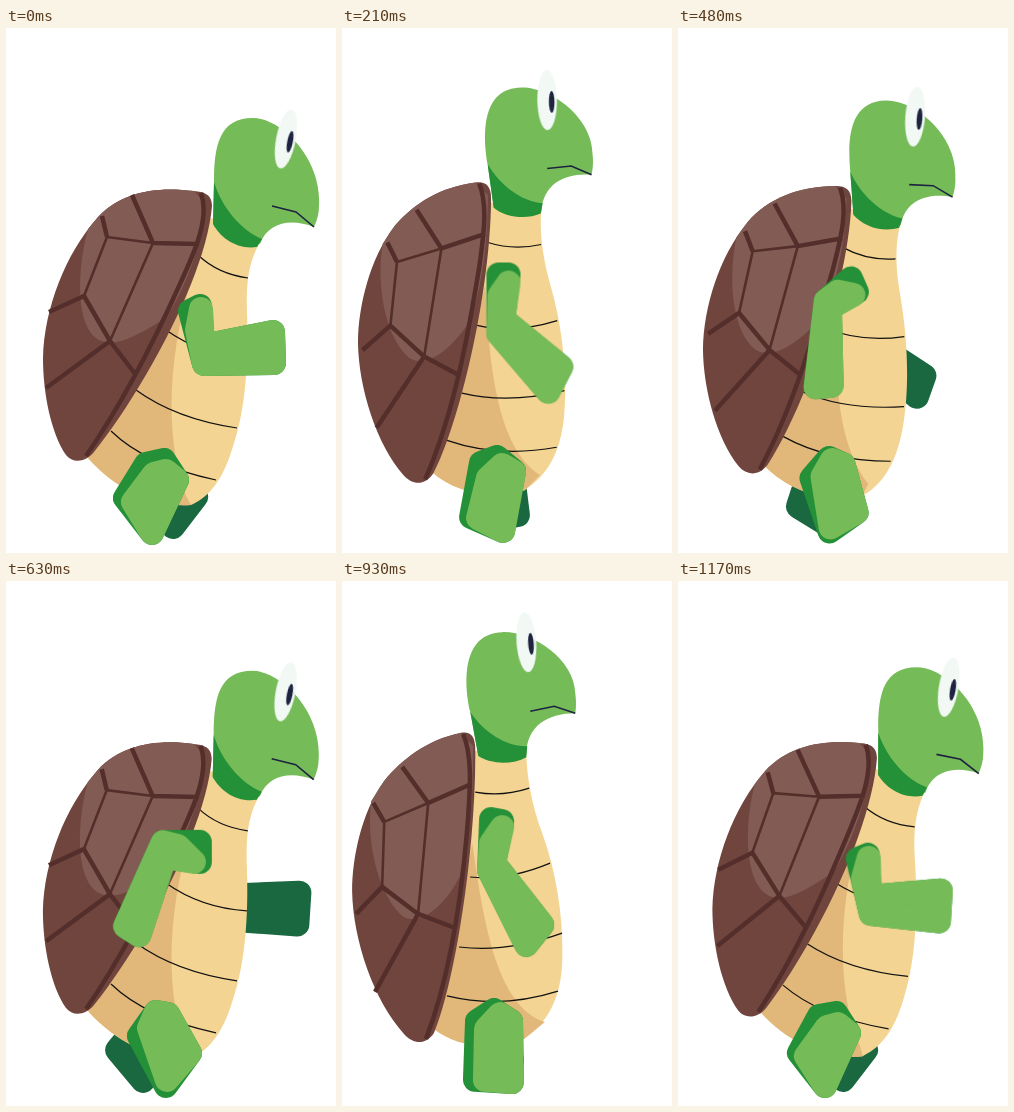
Animation of 330x525 px, one loop 1.2 s. Source, as an HTML page without scripts:

```html
<!DOCTYPE html>
<html lang="en">
<head>
<meta charset="utf-8">
<title>Walking turtle</title>
<style>
  html, body { margin: 0; width: 100%; height: 100%; overflow: hidden; background: #fff; }
  svg { display: block; width: 330px; height: 525px; }

  /* Body parts lean between pose --a and pose --b, twice per stride. */
  .sway, .eye, .shoulder {
    animation: sway 600ms infinite;
    animation-timing-function: linear(0, 0 5%, .49 25%, .775 35%, 1.12 47.5%, 1.11 50%, 1 55%, .89 60%, .45 80%, .1 95%, 0);
  }
  .eye { animation-name: look; }
  .shoulder { animation-name: carry; }
  @keyframes sway { from { d: var(--a); } to { d: var(--b); } }
  @keyframes look {
    from { transform: translate(280px, 111px) rotate(11deg); }
    to { transform: translate(184px, 61px) rotate(-4deg); }
  }
  @keyframes carry { from { transform: none; } to { transform: translate(-34px, -34px); } }

  /* Limbs are polygons whose round stroke softens the corners. */
  .limb { stroke-width: 24; stroke-linejoin: round; animation: 1200ms linear infinite; }
  .far { fill: #1a6840; stroke: #1a6840; }
  .shade { fill: #249037; stroke: #249037; }
  .lit { fill: #75bb58; stroke: #75bb58; }
  .line { fill: none; stroke: #111; stroke-width: 1.2; }
  .seam { fill: none; stroke: #542e2a; stroke-width: 4.5; stroke-linejoin: round; }
  .thin { stroke-width: 2.6; }

  .arm { animation-name: arm; }
  .arm-lit { animation-name: arm-lit; }
  .leg { animation-name: leg; }
  .leg-lit { animation-name: leg-lit; }
  .far-arm { animation-name: far-arm; }
  .far-leg { animation-name: far-leg; }

  @keyframes arm {
    0%, 2.5%, 100% { d: path('M198 336L184 283L194 278L197 318L267 304L268 335Z'); }
    17.5% { d: path('M183 332L183 273L193 273L188 318L246 365L233 390Z'); }
    30% { d: path('M169 315L182 270L194 277L175 314L205 392L187 404Z'); }
    50%, 52.5% { d: path('M157 261L194 261L194 281L159 276L133 354L119 345Z'); }
    62.5% { d: path('M157 293L185 267L193 281L164 304L168 391L150 390Z'); }
    77.5% { d: path('M181 323L183 272L194 274L186 316L234 378L218 398Z'); }
    97.5% { d: path('M196 336L183 281L193 277L195 319L266 313L264 344Z'); }
  }
  @keyframes arm-lit {
    0%, 2.5%, 100% { d: path('M198 336L191 302L195 281L197 318L267 304L268 335Z'); }
    17.5% { d: path('M183 332L184 294L193 281L188 318L246 365L233 390Z'); }
    30% { d: path('M169 315L178 293L193 283L175 314L205 392L187 404Z'); }
    50%, 52.5% { d: path('M157 261L172 265L188 281L159 276L133 354L119 345Z'); }
    62.5% { d: path('M157 293L172 279L190 284L164 304L168 391L150 390Z'); }
    77.5% { d: path('M181 323L183 296L194 280L186 316L234 378L218 398Z'); }
    97.5% { d: path('M196 336L188 301L194 280L195 319L266 313L264 344Z'); }
  }
  @keyframes leg {
    0%, 2.5%, 100% { d: path('M140 436L158 432L171 452L146 505L119 470Z'); }
    17.5% { d: path('M139 435L155 429L172 443L161 503L129 489Z'); }
    30% { d: path('M134 445L152 429L169 440L173 497L143 502Z'); }
    50%, 52.5% { d: path('M133 455L150 431L162 433L184 472L160 505Z'); }
    62.5% { d: path('M133 456L150 429L160 432L179 481L151 505Z'); }
    77.5% { d: path('M135 440L152 429L169 440L170 501L133 499Z'); }
    97.5% { d: path('M141 435L158 432L171 452L147 505L121 472Z'); }
  }
  @keyframes leg-lit {
    0%, 2.5%, 100% { d: path('M148 446L160 443L171 452L146 505L127 474Z'); }
    17.5% { d: path('M146 450L160 437L172 444L161 503L136 490Z'); }
    30% { d: path('M146 450L158 433L169 440L173 497L144 500Z'); }
    50%, 52.5% { d: path('M143 447L150 431L162 433L184 472L161 499Z'); }
    62.5% { d: path('M144 452L151 430L160 432L179 481L152 496Z'); }
    77.5% { d: path('M144 448L158 433L169 440L170 501L143 499Z'); }
    97.5% { d: path('M149 446L160 443L171 452L147 505L128 475Z'); }
  }
  @keyframes far-arm {
    0%, 100% { d: path('M180 320L195 320L195 380L180 380Z'); }
    30% { d: path('M170 320L185 320L198 385L185 395Z'); }
    50%, 52.5% { d: path('M215 338L215 315L294 311L292 343Z'); }
    62.5% { d: path('M180 335L195 325L219 390L212 405Z'); }
    77.5% { d: path('M170 320L185 320L180 390L170 390Z'); }
  }
  @keyframes far-leg {
    0%, 2.5%, 100% { d: path('M150 450L178 450L190 469L167 499Z'); }
    17.5% { d: path('M150 450L172 455L176 487L160 490Z'); }
    30% { d: path('M129 462L160 450L160 492L129 488Z'); }
    50%, 52.5% { d: path('M125 452L150 450L137 500L111 469Z'); }
    62.5% { d: path('M124 460L150 450L145 498L120 479Z'); }
    77.5% { d: path('M145 450L165 450L170 480L150 485Z'); }
    97.5% { d: path('M150 450L178 450L188 469L165 499Z'); }
  }
</style>
</head>
<body>
<svg viewBox="0 0 330 525">
  <path class="limb far far-arm"/>
  <path class="limb far far-leg"/>

  <g id="belly">
    <path class="sway" fill="#f3d492" style="
      --a:path('M205 190L255 212C242 235 240 255 241 285C243 340 238 385 228 415C218 450 205 468 185 477C150 480 110 462 82 430L190 190Z');
      --b:path('M134 170L184 168C184 195 190 225 200 252C216 295 222 345 220 385C218 415 208 440 182 458C150 470 115 466 92 448L125 170Z')"/>
    <path class="sway" fill="#e1b77a" style="
      --a:path('M190 238C165 310 155 400 180 468L185 477C150 480 110 462 82 430L130 360Z');
      --b:path('M130 262C142 345 155 425 203 441L182 458C150 470 115 466 92 448L110 380Z')"/>
    <path class="sway line" style="
      --a:path('M192 227Q212 246 242 250M160 302Q195 327 241 330M130 362Q170 391 231 400M105 403Q140 437 210 452');
      --b:path('M133 211Q160 216 187 207M128 296Q165 300 208 282M117 366Q165 372 220 352M105 415Q160 428 216 410')"/>
  </g>

  <g id="shell">
    <path class="sway" fill="#70453e" style="
      --a:path('M206 178C206 166 198 164 188 163C150 158 115 164 92 189C60 225 38 280 37 330C37 365 45 405 60 427C67 436 80 434 88 424C135 365 200 250 206 178Z');
      --b:path('M133 168C133 155 128 150 118 152C85 159 60 178 42 200C20 230 10 275 10 310C11 360 32 420 62 453C72 464 84 464 92 452C112 405 134 270 133 168Z')"/>
    <path class="sway" fill="#825c54" style="
      --a:path('M82 201L92 189C115 164 150 158 188 163L199 175C196 215 182 255 160 290C130 308 110 320 93 312C70 300 70 245 82 201Z');
      --b:path('M29 220L42 200C60 178 85 159 118 152L131 165C131 230 125 270 118 295C100 330 75 345 60 335C35 312 24 260 29 220Z')"/>
    <path class="sway seam" style="
      --a:path('M195 165C204 190 188 225 178 247C150 310 120 370 80 428M96 188L101 209M126 167L147 215L193 216M43 284L78 268L104 313L130 347M40 360L104 313');
      --b:path('M121 153C130 175 128 205 126 235C122 290 112 385 84 458M31 222L42 241M60 186L86 222L129 203M14 333L40 306L76 333L113 347M33 411L76 333')"/>
    <path class="sway seam thin" style="
      --a:path('M78 268L101 209L147 215L104 313');
      --b:path('M40 306L42 241L86 222L76 333')"/>
  </g>

  <g id="head">
    <path class="sway" fill="#75bb58" style="
      --a:path('M208 155C208 118 213 90 247 90C275 90 316 130 313 178C313 186 311 192 308 199C285 190 262 194 254 216L207 196Z');
      --b:path('M128 131C121 100 120 52 160 51C190 50 232 78 233 112C234 120 234 126 233 132C205 132 184 145 184 174L136 174Z')"/>
    <path class="sway" fill="#249037" style="
      --a:path('M208 154C216 180 235 202 256 211L251 219C230 222 214 209 207 196Z');
      --b:path('M128 131C142 152 165 166 185 165L184 176C170 184 148 183 136 175Z')"/>
    <path class="sway line" style="stroke:#1e2340;stroke-width:1.6;
      --a:path('M266 178L290 184L308 199');
      --b:path('M188 130L212 125L233 132')"/>
    <g class="eye">
      <ellipse rx="9.8" ry="30" fill="#f2f8f4"/>
      <ellipse cx="4.5" cy="2" rx="2.8" ry="11" fill="#1e2340"/>
    </g>
  </g>

  <g class="shoulder">
    <path class="limb shade arm"/>
    <path class="limb lit arm-lit"/>
  </g>
  <path class="limb shade leg"/>
  <path class="limb lit leg-lit"/>
</svg>
</body>
</html>
```
